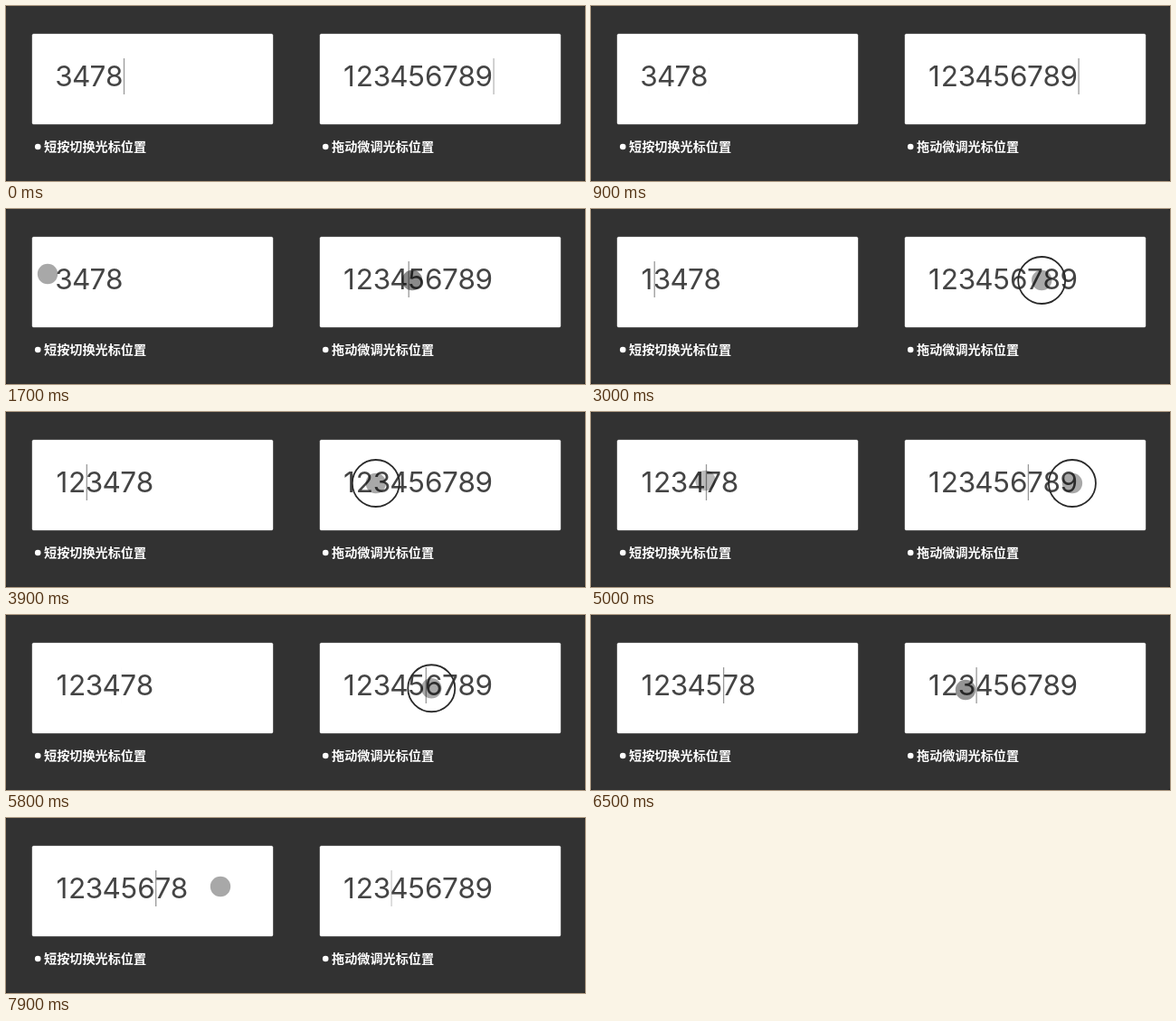
Recreate the animation shown at these times as an HTML page. Size 640x194 px, loop 8000 ms.

```html
<!DOCTYPE html>
<html lang="zh-CN">
<head>
<meta charset="utf-8">
<title>光标位置</title>
<style>
  html, body { margin: 0; width: 100%; height: 100%; overflow: hidden; background: #1f1f1f; }
  svg { display: block; width: 100%; height: 100%; }
  .digits { font: 400 31.5px Inter, "Liberation Sans", sans-serif; fill: #444; text-anchor: middle; }
  .label { font: 700 14.15px "Noto Sans CJK SC", "Noto Sans CJK", sans-serif; fill: #fff; }
  .card { fill: #fff; stroke: #fff; stroke-opacity: .4; }
  .caret { stroke: #999; stroke-width: 1.3; }
  .ring { fill: none; stroke: #2a2a2a; stroke-width: 1.8; }
</style>
</head>
<body>
<svg id="stage" viewBox="0 0 640 194"></svg>
<script>
const LOOP = 8000;
const LEFT_X = 54.5, RIGHT_X = 372.2;
const stage = document.getElementById('stage');

function add(tag, attrs, text) {
  const el = document.createElementNS('http://www.w3.org/2000/svg', tag);
  set(el, attrs);
  if (text) el.textContent = text;
  stage.append(el);
  return el;
}

function set(el, attrs) {
  for (const key in attrs) el.setAttribute(key, attrs[key]);
}

const clamp = v => Math.min(1, Math.max(0, v));
const ramp = (t, a, b) => clamp((t - a) / (b - a));
const ease = p => p * p * (3 - 2 * p);
const pulse = (t, a, b, c, d) => ramp(t, a, b) * (1 - ramp(t, c, d));
const latest = (list, t) => list.filter(item => item[0] <= t).pop();

const advance = d => d === '1' ? 14.5 : d === '7' ? 17.5 : 19.1;
const widthOf = s => [...s].reduce((sum, d) => sum + advance(d), 0);

function setDigits(el, s, x) {
  if (el.textContent === s) return;
  el.textContent = s;
  el.setAttribute('x', [...s].map((d, i) =>
    (x + widthOf(s.slice(0, i)) + advance(d) / 2).toFixed(1)).join(' '));
}

// Soft caret blink, counted from its last reset
function blink(age) {
  const p = age % 1000;
  return 1 - ramp(p, 500, 600) + ramp(p, 900, 1000);
}

function panel(x, label) {
  add('rect', { x, y: 31, width: 266, height: 100, rx: 1.5, class: 'card' });
  add('circle', { cx: x + 6.2, cy: 156, r: 3.3, fill: '#fff' });
  add('text', { x: x + 13, y: 161.3, class: 'label' }, label);
  return {
    digits: add('text', { y: 89, class: 'digits' }),
    caret: add('line', { y1: 58, y2: 98, class: 'caret' }),
    finger: add('circle', { r: 11.2 }),
    ring: add('circle', { class: 'ring', opacity: 0 })
  };
}

function moveCaret(el, x, opacity) {
  set(el, { x1: x + 1.2, x2: x + 1.2, opacity });
}

add('rect', { width: 640, height: 194, rx: 3, fill: '#323232' });
const left = panel(29, '短按切换光标位置');
const right = panel(347, '拖动微调光标位置');
const ALL = '123456789';
setDigits(right.digits, ALL, RIGHT_X);

// time, value, caret index
const edits = [
  [0, '3478', 4], [1850, '3478', 0], [2850, '13478', 1], [3700, '123478', 2],
  [4900, '123478', 4], [6400, '1234578', 5], [7450, '12345678', 6]
];
// appear, release, gone, x, y
const taps = [
  [1500, 1850, 2050, 46, 72], [4650, 4950, 5200, 126.5, 76], [7700, 8100, 8300, 237, 76]
];
// start, end, target x
const drags = [
  [2400, 3050, 499], [3250, 3950, 407.5], [4560, 5140, 553], [5350, 6150, 414]
];
const resets = [[0, -530], [1650, 1650], [2250, 2250], [4750, 4750], [6350, 6350]];

function drawLeft(t) {
  const [start, value, index] = latest(edits, t);
  setDigits(left.digits, value, LEFT_X);
  moveCaret(left.caret, LEFT_X + widthOf(value.slice(0, index)), blink(t - start));
  const [appear, release, gone, cx, cy] = latest(taps, t) || taps[0];
  set(left.finger, { cx, cy, opacity: 0.34 * pulse(t, appear, appear + 120, release, gone) });
}

function drawRight(t) {
  let x = 449;
  for (const [a, b, to] of drags) x += (to - x) * ease(ramp(t, a, b));
  const y = 79 + 4 * ramp(t, 5350, 6150);
  const index = t < 1650 ? 9 : 4 + Math.round((x - 449) / 40);
  moveCaret(right.caret, RIGHT_X + widthOf(ALL.slice(0, index)), blink(t - latest(resets, t)[1]));

  const press = 0.46 - 0.12 * ramp(t, 1800, 1950) + 0.08 * ramp(t, 6200, 6300);
  set(right.finger, { cx: x, cy: y, opacity: press * pulse(t, 1500, 1620, 6500, 6680) });
  set(right.ring, {
    cx: x, cy: y,
    r: 34 - 8 * ease(ramp(t, 1780, 1900)),
    opacity: pulse(t, 1760, 1880, 6200, 6300)
  });
}

function render(now) {
  const t = now % LOOP;
  drawLeft(t);
  drawRight(t);
}

const begin = performance.now();
function tick() {
  render(performance.now() - begin);
  requestAnimationFrame(tick);
}
tick();
</script>
</body>
</html>
```
